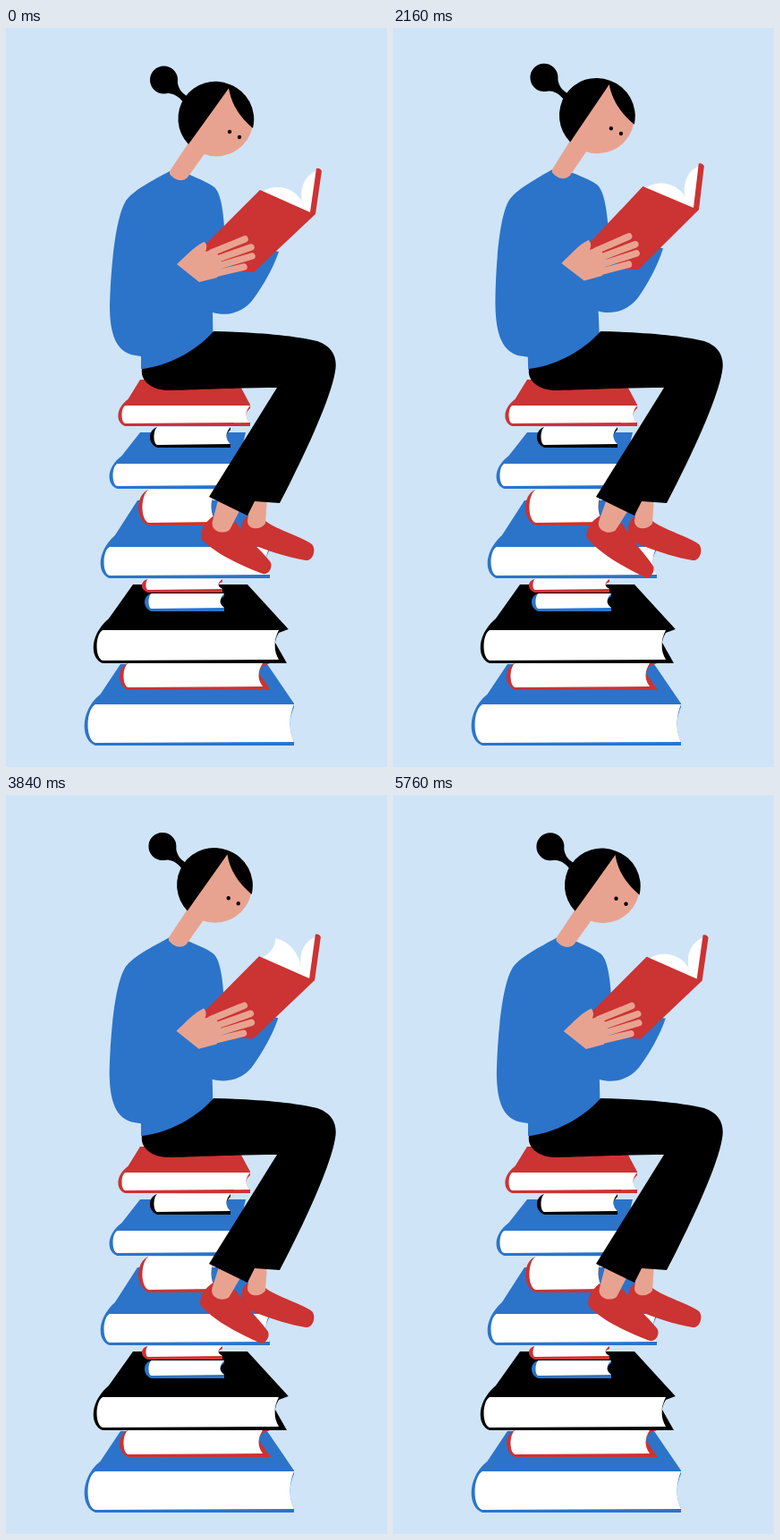
Animation of 426 by 826 pixels, one loop 5840 ms. Source, as an HTML page:

```html
<!DOCTYPE html>
<html lang="en">
<head>
<meta charset="utf-8">
<title>Reader on a stack of books</title>
<style>
  html, body { margin: 0; width: 100%; height: 100%; overflow: hidden; background: #cfe4f7; }
  svg { display: block; width: 100vw; height: 100vh; }
  .blue { fill: #2b74ca; }
  .red { fill: #cc3333; }
  .skin { fill: #e8a390; }
  .white { fill: #fff; }
  .sleeve { fill: none; stroke: #2b74ca; stroke-linejoin: round; }
  .fingers { fill: none; stroke: #e8a390; stroke-width: 7.5; stroke-linecap: round; stroke-linejoin: round; }
</style>
</head>
<body>
<svg viewBox="0 0 426 826" preserveAspectRatio="none">
  <rect width="426" height="826" fill="#cfe4f7"/>
  <g id="stack"></g>

  <path class="red" d="M269 546C263 552 261 562 264 572C285 582 315 592 335 595C344 596 347 582 342 577C330 568 305 562 290 551Z"/>
  <path class="skin" d="M274 525H292L290 554C284 562 270 561 270 551Z"/>
  <g id="foot">
    <path class="red" d="M231 546C222 553 216 563 219 572C238 590 262 600 287 610C295 612 299 600 295 596C284 582 270 572 257 552L249 556Z"/>
    <path class="skin" d="M238 524L262 538L250 561C242 567 228 562 231 551Z"/>
  </g>

  <g class="body">
    <path id="sitTorso" class="blue" d="M183 160C165 170 140 182 133 195C122 215 117 270 116 310C116 340 122 363 145 366L151 367V381L232 375L231 318C245 322 262 320 275 305C290 285 300 265 305 250L245 240C244 215 242 186 233 178C225 172 212 167 203 163Z"/>
    <g id="tossTorso">
      <g id="farArm">
        <path class="sleeve" stroke-width="31" d="M234 304Q266 314 319 270"/>
        <path class="skin" d="M315 260L345 247L362 249L364 265L346 272L335 278L324 282Z"/>
        <path class="fingers" d="M344 250L367 243M352 251L376 248L386 256M355 259L374 257L385 266M355 264L372 271L381 284M331 273L345 285"/>
      </g>
      <path class="blue" d="M183 160C165 168 145 180 136 190L150 250V381L232 375V319L256 306C247 285 246 240 245 225C244 200 240 184 233 178C225 172 212 167 203 163Z"/>
    </g>
    <path class="skin" d="M183 160L207 124L226 135L203 167C197 173 188 170 183 163Z"/>
    <g id="head">
      <circle class="skin" cx="235" cy="102" r="41.5"/>
      <path d="M250 66Q230 94 204 130A41.500 41.500 0 0 1 250 63Z"/>
      <path d="M249 67C252 86 262 100 276 112A41.500 41.500 0 0 0 250 63Z"/>
      <circle cx="176.500" cy="58" r="15.500"/>
      <path d="M191 54C192 69 196 72 205 78L199 84C192 75 186 72 175 73Z"/>
      <circle cx="250" cy="116" r="2.200"/>
      <circle cx="261" cy="122" r="2.200"/>
    </g>
  </g>

  <path d="M152 381C180 378 212 362 232 339C275 340 320 343 348 350C365 356 371 368 368 384C362 420 325 495 306 531L278 529L270 545L227 524L303 402C260 402 200 405 180 405C162 404 150 394 152 381Z"/>

  <g class="body">
    <g id="book">
      <path class="white" d="M287 183C300 174 322 177 331 194C328 178 335 164 347 160L341 208Z"/>
      <path id="page" class="white"/>
      <path class="red" d="M284 181L340 206L347 157Q351 156 353 160L346 208L277 273L262 272L221 249Q221 243 228 237Z"/>
    </g>
    <g id="hand">
      <circle id="wrist" class="skin" cx="203" cy="274" r="15"/>
      <path class="skin" d="M191 264C203 253 212 243 222 239Q226 243 223 250L234 247L241 262L236 279L216 284Z"/>
      <path class="fingers" d="M230 251L267 236M234 259L274 245M234 267L275 255M232 275L266 267"/>
    </g>
    <path id="nearArm" class="sleeve" stroke-width="39"/>
  </g>
</svg>

<script>
const LOOP = 5840, STEP = 80;
const TOSS = 4560, RELEASE = 4800, ARRIVE = 5200, SETTLE = 5520;
const BLUE = '#2b74ca', RED = '#cc3333', BLACK = '#000';
const $ = id => document.getElementById(id);
const bodies = document.querySelectorAll('.body');

const mix = (a, b, u) => a + (b - a) * u;
const span = (t, from, to) => Math.min(1, Math.max(0, (t - from) / (to - from)));
function ramp(t, from, to) {
  const u = span(t, from, to);
  return u * u * (3 - 2 * u);
}
const show = (id, on) => $(id).style.display = on ? '' : 'none';
const move = (id, value) => $(id).setAttribute('transform', value);

// Front face from (x, y) to (end, y + h); the lid rises behind it, the lip is the cover corner past the pages
function book(color, x, end, y, h, { rise = 0, left, right = end, lip = 0 } = {}) {
  const curl = 4 + h * .2, front = x + curl, foot = y + h, edge = end - lip;
  left ??= front;
  const fore = `Q${edge - 9} ${y + h / 2} ${edge}`;
  const spine = (dx, top) => `C${x + dx - curl / 3} ${foot - h * .1} ${x + dx - curl / 3} ${y + h * .15} ${top}`;
  const joint = `${mix(front, left, .2)} ${y - rise * .25}`;
  const cover = `M${left} ${y - rise}H${right}L${end + lip * .2} ${y - 1}L${edge} ${y + 3}${fore} ${foot - 2}` +
    `V${foot + 2}H${front}${spine(0, joint)}Z`;
  const corner = lip ? `M${edge - 4} ${y + h * .4}L${end} ${foot + 2}H${edge - 4}Z` : '';
  const pages = `M${front} ${y}H${edge}${fore} ${foot - 2}L${front} ${foot - 1}${spine(6, `${front} ${y}`)}Z`;
  return `<path fill="${color}" d="${cover}${corner}"/><path fill="#fff" d="${pages}"/>`;
}

$('stack').innerHTML = [
  book(BLUE, 87, 322, 756, 44, { rise: 45, left: 128, right: 292 }),
  book(RED, 127, 296, 710, 28, { lip: 9 }),
  book(BLACK, 97, 314, 673, 35, { rise: 51, left: 142, right: 270, lip: 9 }),
  book(BLUE, 155, 244, 632, 18),
  book(RED, 152, 242, 616, 13),
  book(BLUE, 105, 295, 580, 33, { rise: 52, left: 147, right: 262 }),
  book(RED, 148, 234, 516, 38),
  book(BLUE, 115, 260, 487, 26, { rise: 35, left: 150, right: 268 }),
  book(BLACK, 161, 251, 446, 21),
  book(RED, 125, 273, 422, 21, { rise: 29, left: 150, right: 258 })
].join('');

function lean(t) {
  const s = 1.05 * ramp(t, 0, 1000) - 2.35 * ramp(t, 1280, 2240) + 1.1 * ramp(t, 2900, 4000) + .2 * ramp(t, 5680, LOOP);
  const dx = s * .019, dy = s * .007, tilt = s * .018;
  const m = [1, tilt, -dx, 1 - dy, dx * 375, dy * 375 - tilt * 185];
  bodies.forEach(b => b.setAttribute('transform', `matrix(${m})`));
}

function tapFoot(t) {
  const tap = ramp(t, 1280, 2160) - .4 * ramp(t, 2240, 3200) - .6 * ramp(t, 3840, 4640);
  move('foot', `rotate(${tap * 5} 240 545)`);
}

function turnPage(t) {
  const u = span(t, 2720, 4200);
  show('page', u > 0 && u < 1);
  const x = mix(347, 288, u), y = mix(160, 181, u) - (8 + 18 * u) * Math.sin(Math.PI * u);
  $('page').setAttribute('d', `M288 183Q${mix(330, 294, u)} ${mix(188, 168, u)} ${x} ${y}` +
    `Q${mix(328, 326, u)} ${mix(172, 166, u)} 331 195Z`);
}

function toss(t) {
  const active = t >= TOSS && t < SETTLE;
  show('sitTorso', !active);
  for (const id of ['tossTorso', 'nearArm', 'wrist']) show(id, active);
  show('book', t < RELEASE + 2 * STEP || t >= ARRIVE);

  const low = active ? ramp(t, 4480, 4640) - ramp(t, 5280, SETTLE) : 0;
  const back = ramp(t, 4640, RELEASE) - ramp(t, 4880, 5120);
  const out = ramp(t, RELEASE, 5040) - ramp(t, 5360, SETTLE);
  const wrist = { x: 203 - 61 * low - 87 * back, y: 274 + 148 * low - 22 * back, turn: 54 * low + 86 * back };
  const held = ({ x, y, turn }) => `translate(${x} ${y}) rotate(${turn}) translate(-203 -274)`;

  let tome = wrist;
  if (t >= ARRIVE) {
    const u = 1 - span(t, ARRIVE, SETTLE);
    tome = { x: 203 + 127 * u, y: 274 - 219 * u, turn: -15 * u };
  } else if (t > RELEASE) {
    const n = (t - RELEASE) / STEP;
    tome = { x: wrist.x - 115 * n, y: wrist.y - 60 * n, turn: wrist.turn + 50 * n };
  }
  move('hand', held(wrist));
  move('book', held(tome));
  move('head', `rotate(${-13.5 * low - 2 * back} 206 147)`);
  move('farArm', `translate(${20 * out} 0) rotate(${-25 * (1 - low) - 10 * out} 250 305)`);

  const ex = 118 - 24 * low - 4 * back, ey = 335 - 10 * back;
  const k = 1 - 7 / Math.hypot(wrist.x - ex, wrist.y - ey);
  $('nearArm').setAttribute('d', `M158 195Q116 258 ${ex} ${ey}L${mix(ex, wrist.x, k)} ${mix(ey, wrist.y, k)}`);
}

function draw(now) {
  const n = Math.floor(now % LOOP / STEP), t = n * STEP;
  const jitter = Math.sin(n * Math.PI * 2 / 3);
  move('stack', `translate(${jitter * .8} ${jitter * -.4})`);
  lean(t);
  tapFoot(t);
  turnPage(t);
  toss(t);
}

const start = performance.now();
function tick() {
  draw(performance.now() - start);
  requestAnimationFrame(tick);
}
tick();
</script>
</body>
</html>
```
